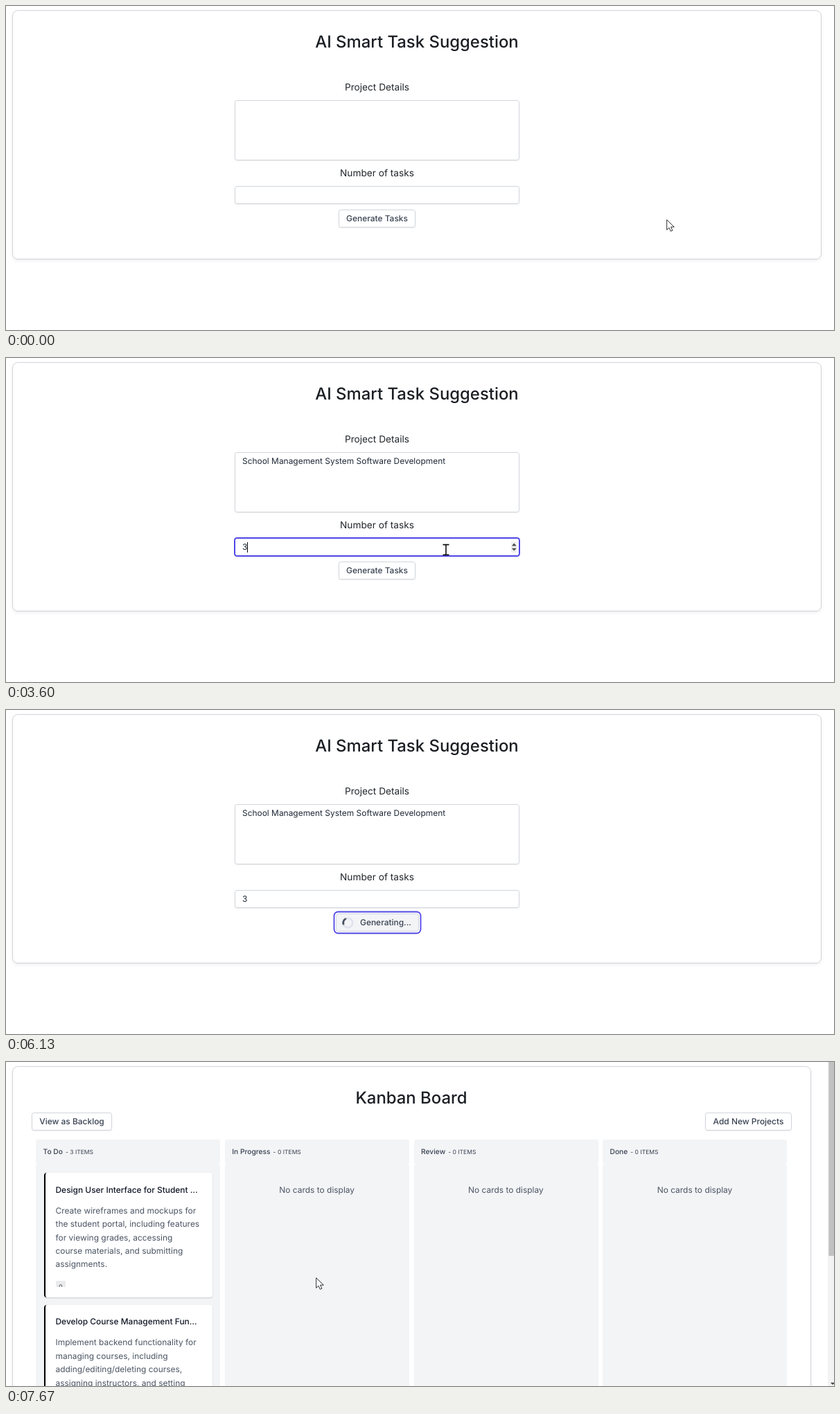
These frames come from a looping animation (1195 px wide and 468 px high, 8 s). An HTML page:

```html
<!DOCTYPE html>
<html lang="en">
<head>
<meta charset="utf-8">
<title>AI Smart Task Suggestion</title>
<style>
  :root {
    --line: #d1d5db;
    --accent: #4f46e5;
    --soft: 0 1px 2px rgba(0, 0, 0, .07);
    --ring: 0 0 0 1.6px #fff, 0 0 0 3.4px var(--accent);
  }
  * { box-sizing: border-box; }
  html, body { margin: 0; width: 100%; height: 100%; overflow: hidden; background: #fff; }
  body {
    position: relative;
    font: 11.95px/20px Inter, Roboto, sans-serif;
    font-optical-sizing: none;
    text-rendering: geometricPrecision;
    color: #1f2937;
  }

  /* One shared 8 s clock; changes snap to a 15 fps grid. */
  .play { animation: 8s step-end -4ms infinite; }

  /* Boxes: x, y, w, h. Text: x and the vertical middle y. */
  .box, .t { position: absolute; left: calc(var(--x) * 1px); }
  .box { top: calc(var(--y) * 1px); width: calc(var(--w) * 1px); height: calc(var(--h) * 1px); }
  .t { top: calc(var(--y) * 1px - 10px); white-space: nowrap; }
  .mid { width: 400px; margin-left: -200px; text-align: center; }

  .page { position: absolute; inset: 0; overflow: hidden; background: #fff; }
  .panel { border: 1px solid var(--line); border-radius: 8px; box-shadow: 0 2px 4px rgba(0, 0, 0, .075); }
  .title { font-size: 23.9px; font-weight: 500; color: #1b1f24; }
  .label { font-size: 13.66px; color: #212529; }
  .field, .btn { background: #fff; border: 1px solid var(--line); border-radius: 3.4px; box-shadow: var(--soft); }
  .btn { font-weight: 500; line-height: 24px; text-align: center; color: #374151; white-space: nowrap; }

  .caret { position: absolute; width: 1px; height: 15px; background: #000; }
  .t .caret { top: 2.5px; left: 100%; }
  .details { animation-name: details; }
  .count { animation-name: count; }
  .hide { opacity: 0; }
  .blink1 { animation-name: blink1; }
  .blink2 { animation-name: blink2; }
  .blink3 { animation-name: blink3; }
  .blink4 { animation-name: blink4; }
  .typed { animation-name: typed; }
  .digit { animation-name: digit; }
  .arrows { animation-name: arrows; }
  .go { animation-name: go; }
  .busy { animation-name: busy; padding-left: 34px; text-align: left; }
  .board { animation-name: board; }

  .spin { position: absolute; left: 8px; top: 3.5px; width: 17px; height: 17px; animation: spin 1333.333ms steps(20) -4ms infinite; }

  @keyframes details {
    8.333% { border-color: var(--accent); box-shadow: 0 0 0 1px var(--accent); }
    35.833% { border-color: var(--line); box-shadow: var(--soft); }
  }
  @keyframes count {
    35.833% { border-color: var(--accent); box-shadow: 0 0 0 1px var(--accent); }
    60.833% { border-color: var(--line); box-shadow: var(--soft); }
  }
  @keyframes blink1 { 8.333% { opacity: 1; } 15.833% { opacity: 0; } }
  @keyframes blink2 { 22.5% { opacity: 1; } 29.167% { opacity: 0; } }
  @keyframes blink3 { 35.833% { opacity: 1; } 42.5% { opacity: 0; } }
  @keyframes blink4 { 45% { opacity: 1; } 51.667% { opacity: 0; } }
  @keyframes typed { 22.5% { opacity: 1; } }
  @keyframes digit { 45% { opacity: 1; } }
  @keyframes arrows { 30.833% { opacity: 1; } 60.833% { opacity: 0; } }
  @keyframes go {
    56.667% { background: #f9fafb; }
    60.833% { background: #f3f4f6; box-shadow: var(--ring); }
    61.667% { opacity: 0; }
  }
  @keyframes busy {
    61.667% { opacity: 1; background: #f3f4f6; box-shadow: var(--ring); }
    86.667% { opacity: 1; background: #fff; box-shadow: var(--soft); }
  }
  @keyframes board { 90.833% { opacity: 1; } }
  @keyframes spin { from { transform: rotate(-59deg); } to { transform: rotate(301deg); } }

  /* Board */
  .head, .lane { background: #f3f4f6; border-radius: 3.4px; }
  .head { padding-left: 10.5px; font-size: 10.25px; font-weight: 500; line-height: 36px; color: #374151; white-space: nowrap; }
  .head small { margin-left: 4px; font-size: 8.54px; font-weight: 400; }
  .note { color: #4b5563; }
  .card { background: #fff; border-left: 2px solid #000; border-radius: 4px; box-shadow: 0 1px 2px rgba(0, 0, 0, .18); }
  .card-title { font-weight: 500; color: #111827; }
  .card-text { line-height: 19.45px; color: #4b5563; }
  .tag { overflow: hidden; background: #ebebeb; font-size: 9px; line-height: 20px; text-align: center; color: #374151; }

  /* Pointer: origin is the hotspot */
  .pointer { position: absolute; left: 0; top: 0; width: 1px; height: 1px; overflow: visible; animation-name: move; }
  .arrow { animation-name: arrow; }
  .beam { animation-name: beam; }
  .hand { animation-name: hand; }
  @keyframes arrow {
    4.167%, 30.833%, 56.667%, 73.333% { opacity: 0; }
    30%, 54.167%, 61.667%, 93.333% { opacity: 1; }
  }
  @keyframes beam {
    4.167%, 30.833% { opacity: 1; }
    30%, 54.167% { opacity: 0; }
  }
  @keyframes hand { 56.667% { opacity: 1; } 61.667% { opacity: 0; } }
  @keyframes move {
    0% { transform: translate(953px, 308px); }
    .833% { transform: translate(953px, 308px); animation-timing-function: steps(2, start); }
    2.5% { transform: translate(900px, 287px); animation-timing-function: steps(3, start); }
    5% { transform: translate(700px, 200px); animation-timing-function: steps(2, start); }
    6.667% { transform: translate(652px, 180px); }
    27.5% { transform: translate(652px, 180px); animation-timing-function: steps(2, start); }
    29.167% { transform: translate(650px, 192px); animation-timing-function: steps(3, start); }
    31.667% { transform: translate(638px, 262px); animation-timing-function: steps(2, start); }
    33.333% { transform: translate(635px, 277px); }
    52.5% { transform: translate(635px, 277px); animation-timing-function: steps(8, start); }
    59.167% { transform: translate(573px, 305px); }
    65% { transform: translate(573px, 305px); animation-timing-function: steps(3, start); }
    67.5% { transform: translate(560px, 318px); animation-timing-function: steps(5, start); }
    71.667% { transform: translate(440px, 401px); animation-timing-function: steps(2, start); }
    73.333% { transform: translate(201px, 452px); }
    93.333% { transform: translate(218px, 393px); }
    94.167% { transform: translate(330px, 350px); }
    95% { transform: translate(410px, 322px); }
    95.833%, 100% { transform: translate(447px, 311px); }
  }
</style>
</head>
<body>

<div class="page">
  <div class="box panel" style="--x:9;--y:6;--w:1168;--h:360"></div>
  <div class="t mid title" style="--x:593;--y:51.5">AI Smart Task Suggestion</div>

  <div class="t mid label" style="--x:535.5;--y:117.5">Project Details</div>
  <div class="box field play details" style="--x:330;--y:136;--w:411;--h:87"></div>
  <i class="caret hide play blink1" style="left:341px;top:142px"></i>
  <div class="t hide play typed" style="--x:341;--y:148.5">School Management System Software Development<i class="caret hide play blink2"></i></div>

  <div class="t mid label" style="--x:535.5;--y:241.5">Number of tasks</div>
  <div class="box field play count" style="--x:330;--y:260;--w:411;--h:26"></div>
  <i class="caret hide play blink3" style="left:341px;top:266px"></i>
  <div class="t hide play digit" style="--x:341;--y:273.3">3<i class="caret hide play blink4"></i></div>
  <svg class="box hide play arrows" style="--x:729;--y:265;--w:8;--h:16" viewBox="0 0 8 16">
    <path fill="#f0f0f0" d="M0 0h8v16H0z"/>
    <path fill="#4d4d4d" d="M.8 6.4 4.3 2.6 7.8 6.4zM.8 9.8 4.3 13.6 7.8 9.8z"/>
  </svg>

  <div class="box btn play go" style="--x:480;--y:294;--w:111;--h:26">Generate Tasks</div>
  <div class="box btn hide play busy" style="--x:476;--y:294;--w:120;--h:26">
    <svg class="spin" viewBox="-8.5 -8.5 17 17" fill="none" stroke-width="2.6">
      <circle r="6.8" stroke="#dfe2ee"/>
      <circle r="6.8" stroke="#374151" pathLength="4" stroke-dasharray="1 3"/>
    </svg>Generating...
  </div>
</div>

<div class="page hide play board">
  <div class="box panel" style="--x:9;--y:6;--w:1153;--h:500"></div>
  <div class="t mid title" style="--x:585;--y:51.5">Kanban Board</div>
  <div class="box btn" style="--x:37;--y:73;--w:116;--h:26">View as Backlog</div>
  <div class="box btn" style="--x:1009;--y:73;--w:125;--h:26">Add New Projects</div>

  <div class="box head" style="--x:43;--y:112;--w:266;--h:36">To Do<small>- 3 ITEMS</small></div>
  <div class="box head" style="--x:315.7;--y:112;--w:266;--h:36">In Progress<small>- 0 ITEMS</small></div>
  <div class="box head" style="--x:588.5;--y:112;--w:266;--h:36">Review<small>- 0 ITEMS</small></div>
  <div class="box head" style="--x:861;--y:112;--w:266;--h:36">Done<small>- 0 ITEMS</small></div>
  <div class="box lane" style="--x:43;--y:148;--w:266;--h:340"></div>
  <div class="box lane" style="--x:315.7;--y:148;--w:266;--h:340"></div>
  <div class="box lane" style="--x:588.5;--y:148;--w:266;--h:340"></div>
  <div class="box lane" style="--x:861;--y:148;--w:266;--h:340"></div>
  <div class="t mid note" style="--x:448.7;--y:185.3">No cards to display</div>
  <div class="t mid note" style="--x:721.4;--y:185.3">No cards to display</div>
  <div class="t mid note" style="--x:994;--y:185.3">No cards to display</div>

  <div class="box card" style="--x:55;--y:160;--w:243;--h:180"></div>
  <div class="t card-title" style="--x:71.5;--y:184.5">Design User Interface for Student …</div>
  <div class="t card-text" style="--x:71.5;--y:214.6">Create wireframes and mockups for<br>the student portal, including features<br>for viewing grades, accessing<br>course materials, and submitting<br>assignments.</div>
  <div class="box tag" style="--x:72;--y:316;--w:13.5;--h:9">0</div>

  <div class="box card" style="--x:55;--y:350.5;--w:243;--h:180"></div>
  <div class="t card-title" style="--x:71.5;--y:375.3">Develop Course Management Fun…</div>
  <div class="t card-text" style="--x:71.5;--y:405.4">Implement backend functionality for<br>managing courses, including<br>adding/editing/deleting courses,<br>assigning instructors, and setting</div>

  <svg class="box" style="--x:1186;--y:0;--w:9;--h:468" viewBox="0 0 9 468">
    <path fill="#f3f3f3" d="M0 0h9v468H0z"/>
    <path fill="#c1c1c1" d="M1.3 0H9v280H1.3z"/>
    <path fill="#505050" d="M4 463h6l-3 3.5z"/>
  </svg>
</div>

<svg class="pointer play" stroke-linejoin="round">
  <path class="play arrow" fill="#fff" stroke="#222" stroke-width=".95" d="M.7.8V15.4L4 12.3 6.4 17.3 8.9 16.2 6.6 11.2H11.3Z"/>
  <g class="hide play beam" fill="none">
    <path stroke="#111" stroke-width="1.6" d="M-4.5-7.4H4.5M-4.5 7.4H4.5M0-7.4V7.4"/>
  </g>
  <path class="hide play hand" fill="#fff" stroke="#222" stroke-width=".95" d="M-1.5 11V2a1.6 1.6 0 0 1 3.2 0V7.5q2.6-.9 3 .6 2.4-.7 2.9.8 2.5-.4 2.5 1.8V15q0 2-1.5 4.8H-.6q-.8-2-2.6-3.8L-5.3 12.4q-.6-1.6 1-2.2 1.4-.2 2.8 1.8Z"/>
</svg>

</body>
</html>
```
